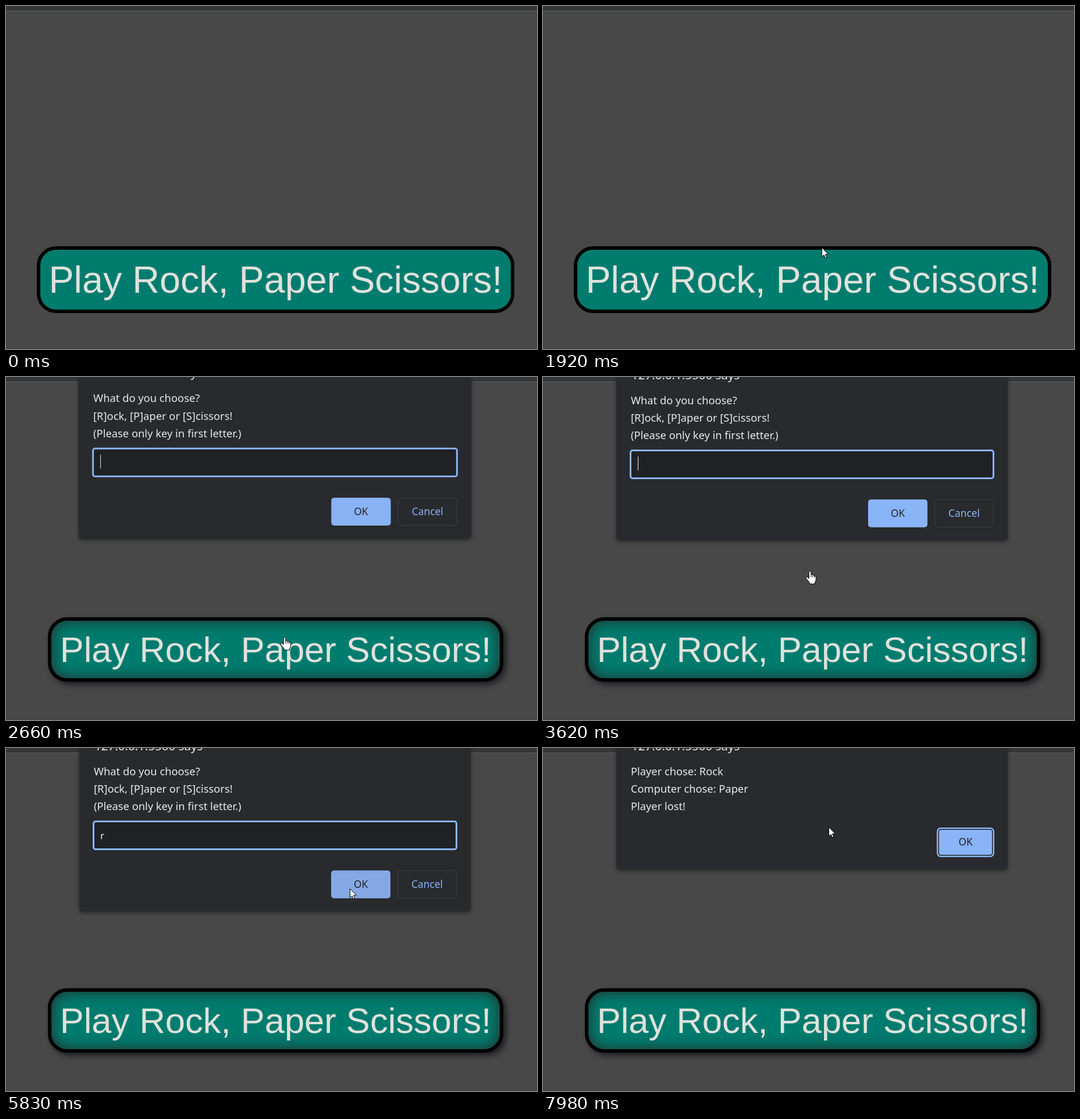
An HTML page for the animation above (8 s loop, 913 px wide and 591 px high).

```html
<!DOCTYPE html>
<html lang="en">
<head>
<meta charset="utf-8">
<title>Rock, Paper, Scissors</title>
<style>
html, body { margin: 0; width: 100%; height: 100%; overflow: hidden; background: #484848; }
#stage { position: relative; width: 913px; height: 591px; overflow: hidden; background: #484848; }
#stage div, #stage span, #stage svg { position: absolute; box-sizing: border-box; white-space: pre; }
#bar { left: 0; top: 0; width: 913px; height: 9px; background: #35363a; border-bottom: 1px solid #5e5f61; }
#edge { inset: 0; border: solid #424043; border-width: 0 1px 1px 0; }

#play {
  left: 53px; top: 414px; width: 821px; height: 115px;
  border: 6px solid #000; border-radius: 33px; background: #007c6e; color: #dfe1dc;
  font: 64.7px/103px "Liberation Sans", Arial, sans-serif;
  display: flex; justify-content: center;
}
#play.hover { box-shadow: 5px 5px 10px #1d1d26, inset 0 0 25px #282828; }
#play.down { left: 72px; width: 783px; height: 111px; font-size: 61.5px; line-height: 99px; }

.dialog {
  left: 126px; top: 0; width: 673px; background: #292a2d; color: #e8eaed;
  border-radius: 0 0 6px 6px; box-shadow: 0 2px 6px rgba(0, 0, 0, .45);
  transform-origin: 336.5px 1250px;
  font: 18.3px/30px "Noto Sans", "Open Sans", sans-serif;
}
#ask { height: 282px; }
#result { height: 210px; }
.title { left: 26px; top: -19px; font-size: 20.5px; }
.body { left: 25px; top: 25px; }
#field {
  left: 23px; top: 125px; width: 627px; height: 51px; background: #202124;
  border: 3px solid #8ab4f8; border-radius: 5px;
}
#letter { left: 10px; top: 8px; font-size: 17px; }
#caret { left: 11px; top: 9px; width: 1px; height: 24px; background: #e8eaed; }
#caret.after { left: 19px; }
.button {
  top: 211px; width: 102px; height: 48px; border-radius: 5px;
  text-align: center; font-size: 17.3px; font-weight: 500; line-height: 47px;
}
.main { background: #8ab4f8; color: #202124; }
.main.hover { background: #85a8e4; }
#askOk { left: 433px; }
#cancel { left: 547px; color: #8ab4f8; border: 1px solid #3c4043; line-height: 45px; }
#resultOk {
  left: 555px; top: 141px; width: 91px; height: 43px; line-height: 42px; border-radius: 3px;
  box-shadow: 0 0 0 1.5px #202124, 0 0 0 4px #8ab4f8;
}
#cursor { left: 0; top: 0; width: 24px; height: 28px; overflow: visible; }
#cursor path { fill: #fff; stroke: #000; stroke-linejoin: round; }
</style>
</head>
<body>
<div id="stage">
  <div id="bar"></div>
  <div id="edge"></div>
  <div id="play">Play Rock, Paper Scissors!</div>

  <div id="ask" class="dialog">
    <span class="title">127.0.0.1:5500 says</span>
    <div class="body">What do you choose?
[R]ock, [P]aper or [S]cissors!
(Please only key in first letter.)</div>
    <div id="field"><span id="letter">r</span><div id="caret"></div></div>
    <div id="askOk" class="button main">OK</div>
    <div id="cancel" class="button">Cancel</div>
  </div>

  <div id="result" class="dialog">
    <span class="title">127.0.0.1:5500 says</span>
    <div class="body">Player chose: Rock
Computer chose: Paper
Player lost!</div>
    <div id="resultOk" class="button main">OK</div>
  </div>

  <svg id="cursor">
    <path id="arrow" d="M.5 .5V16.2L4.1 12.8L6.5 18.3L8.9 17.2L6.5 11.9H11.5Z"/>
    <g id="hand" transform="translate(1 0)">
      <path d="M-1.8 1.5Q0 -1 1.8 1.5V6.5Q4 5.6 4.8 7.5Q7 6.6 7.6 8.7Q10 8.2 10.3 10.8V15Q10.2 18 8.5 20V22.5H-.5V20.5L-6.2 13.6Q-7.6 11 -5.5 10.4Q-4.2 10.3 -1.8 13Z"/>
      <path d="M1.8 7V11M4.8 8V11M7.6 9V11.5"/>
    </g>
  </svg>
</div>
<script>
const LOOP = 8000, BLINK = 530;
const ENTER = 530, PRESS = 2450, OPEN = 2499, TYPE = 5140;
const CONFIRM = 6190, REPLY = 6250, CLOSED = 6460;
const $ = id => document.getElementById(id);

// Pointer strokes, each a curve from where the last one ended.
const origin = { x: 520, y: 480 };
const strokes = [
  { from: ENTER, to: 1570, bend: [485, 210], end: [479, 408] },
  { from: 1887, to: 2050, bend: [479, 428], end: [478, 448] },
  { from: 2730, to: 3350, bend: [476, 324], end: [458, 334] },
  { from: 5280, to: 5970, bend: [594, 248], end: [598, 233] },
  { from: 6690, to: 7150, bend: [500, 400], end: [284, 53] },
  { from: 7420, to: 7980, bend: [380, 80], end: [491, 136] }
];

const clamp = v => Math.min(1, Math.max(0, v));
const curve = (a, b, c, u) => (1 - u) ** 2 * a + 2 * u * (1 - u) * b + u * u * c;

function pointerAt(t) {
  let { x, y } = origin;
  for (const { from, to, bend, end } of strokes) {
    const u = clamp((t - from) / (to - from));
    if (u === 0) break;
    x = curve(x, bend[0], end[0], u);
    y = curve(y, bend[1], end[1], u);
  }
  return { x, y };
}

function show(el, on) {
  el.style.display = on ? "" : "none";
}

function pose(el, grow, alpha) {
  el.style.transform = grow ? `scale(${1 + grow})` : "none";
  el.style.opacity = alpha;
}

function enter(el, t, start) {
  const left = 1 - clamp((t - start) / 210);
  pose(el, .027 * left ** 1.5, 1 - left ** 3);
}

function leave(el, t) {
  const u = 1 - (CLOSED - t) / 300;
  pose(el, .03 * u * u, 1 - .9 * u);
}

function draw(now) {
  const t = now % LOOP;
  const { x, y } = pointerAt(t);
  const pressed = t >= PRESS, typed = t >= TYPE, confirmed = t >= CONFIRM;

  const hover = pressed || t >= ENTER && y >= 420;
  $("play").classList.toggle("hover", hover);
  $("play").classList.toggle("down", pressed);

  show($("ask"), t >= OPEN && t < CLOSED);
  if (confirmed) leave($("ask"), t);
  else enter($("ask"), t, OPEN);
  show($("result"), t >= REPLY);
  enter($("result"), t, REPLY);

  show($("letter"), typed);
  $("caret").classList.toggle("after", typed);
  const blinkStart = typed ? TYPE : PRESS + 110;
  show($("caret"), Math.floor((t - blinkStart) / BLINK) % 2 === 0);
  $("askOk").classList.toggle("hover", x > 559 && y < 259);

  // The hand stays frozen from the confirmation until the next stroke.
  const hand = hover && (confirmed ? t < 6730 : y > 282);
  show($("cursor"), t >= ENTER);
  show($("hand"), hand);
  show($("arrow"), !hand);
  $("cursor").style.transform = `translate(${Math.round(x)}px, ${Math.round(y)}px)`;
}

const begin = performance.now();
function tick() {
  draw(performance.now() - begin);
  requestAnimationFrame(tick);
}
tick();
</script>
</body>
</html>
```
